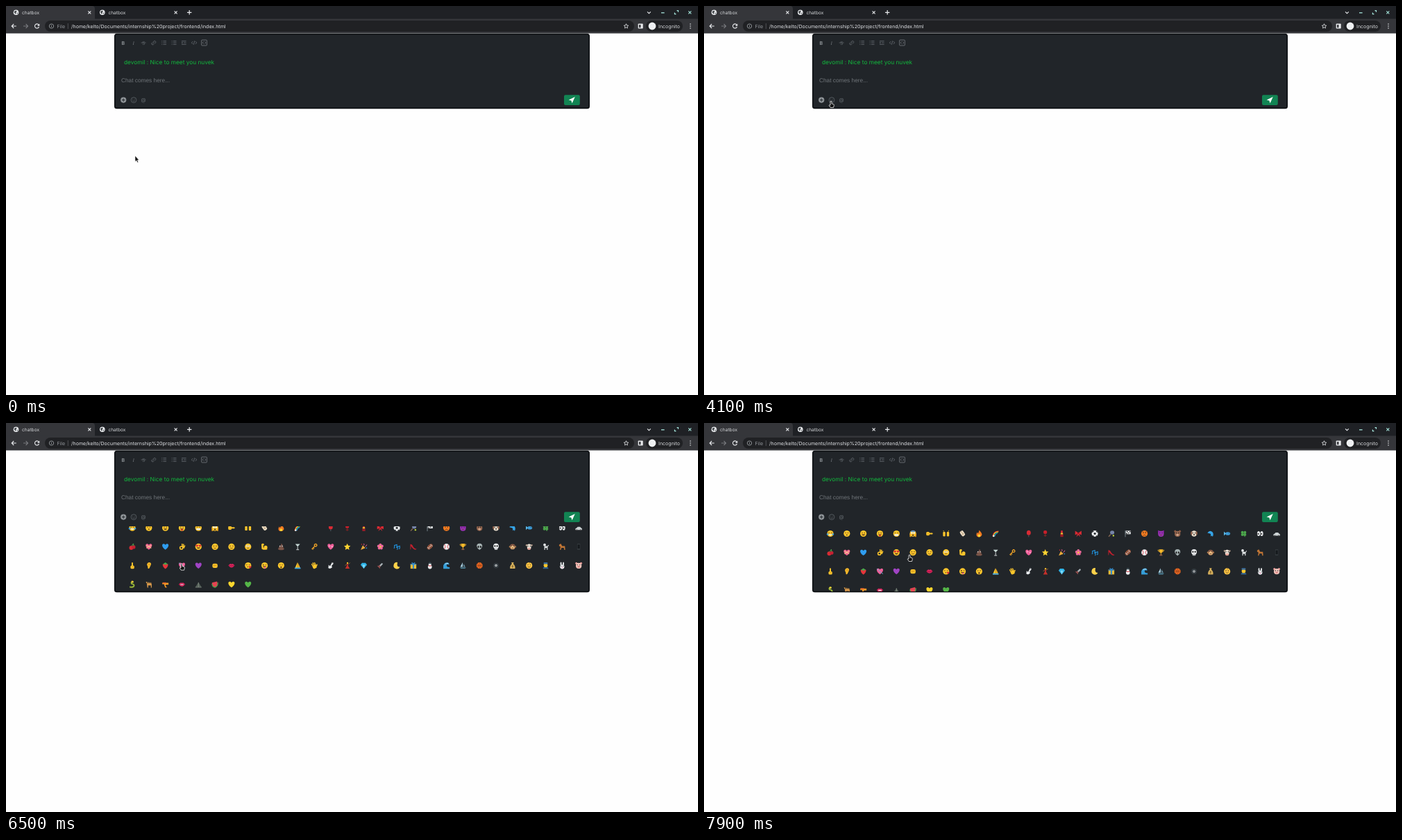
These frames come from a looping animation (997 by 561 pixels, 8 s). An HTML page:

```html
<!DOCTYPE html>
<html lang="en">
<head>
<meta charset="utf-8">
<title>chatbox</title>
<style>
html, body { margin: 0; width: 100%; height: 100%; overflow: hidden; background: #fefefe; }
svg { display: block; width: 997px; height: 561px; }
text { font: 7.05px Inter, sans-serif; text-rendering: geometricPrecision; white-space: pre; }
</style>
</head>
<body>
<svg id="stage" viewBox="0 0 997 561" xmlns="http://www.w3.org/2000/svg"></svg>
<script>
const LOOP = 8000, STEP = 100, OPEN_AT = 4500;

// Drawing helpers
const dot = (x, y, r, f) => `<circle cx="${x}" cy="${y}" r="${r}" fill="${f}"/>`;
const ring = (x, y, r, s, w = 1) => `<circle cx="${x}" cy="${y}" r="${r}" fill="none" stroke="${s}" stroke-width="${w}"/>`;
const fill = (d, f) => `<path d="${d}" fill="${f}"/>`;
const line = (d, s, w = 1) => `<path d="${d}" fill="none" stroke="${s}" stroke-width="${w}"/>`;
const box = (x, y, w, h, f, r = 0) => `<rect x="${x}" y="${y}" width="${w}" height="${h}" rx="${r}" fill="${f}"/>`;
const oval = (x, y, a, b, f) => `<ellipse cx="${x}" cy="${y}" rx="${a}" ry="${b}" fill="${f}"/>`;
const label = (x, y, s, f, size = 7.05, font = 'Inter, sans-serif') =>
  `<text x="${x}" y="${y}" fill="${f}" style="font-size:${size}px;font-family:${font}">${s}</text>`;
const at = (x, y, art, k = 1) => `<g transform="translate(${x} ${y}) scale(${k})">${art}</g>`;

// Emoji, each about 10 units wide around its centre
const Y = '#fcc62c', INK = '#5f4020', RED = '#d92b34', PINK = '#f0609a', BLUE = '#35a5e8',
  GREEN = '#4ca64c', WHITE = '#eceff1', BROWN = '#8a5a44', GREY = '#78858c', ORANGE = '#f47b20';
const eyes = (f = INK, r = .75) => dot(-1.7, -1, r, f) + dot(1.7, -1, r, f);
const grin = (f = WHITE) => fill('M-2.8 1H2.8Q0 5-2.8 1', f);
const face = (mouth, look = eyes(), skin = Y) => dot(0, 0, 4.7, skin) + look + mouth;
const heart = f => fill('M0 4.5C-8-1-4-7 0-2.6C4-7 8-1 0 4.5', f);
const tiny = (x, y, f, k = .4) => at(x, y, heart(f), k);
const smile = line('M-2 1.6Q0 3.4 2 1.6', INK, .8);
const flat = line('M-1.6 2H1.6', INK, .8);
const shut = line('M-3-1h2M1-1h2', INK, .8);
const ears = (f, x = 3.4, y = -3.4, r = 1.6) => dot(-x, y, r, f) + dot(x, y, r, f);
const lips = fill('M-4.7 0Q-2-4 0-2Q2-4 4.7 0Q0 6-4.7 0', '#e0245e') + line('M-4 0Q0 1 4 0', '#8e1238', .8);
const flower = (f, mid) => [0, 1, 2, 3, 4].map(i =>
  dot(2.7 * Math.sin(i * 1.257), -2.7 * Math.cos(i * 1.257), 2, f)).join('') + dot(0, 0, 1.2, mid);
const fist = box(-3.8, -3, 7.6, 6.5, Y, 2.4) + line('M-3 0H2M-1-2V2M1.5-2V1', '#c98b15', .6);
const finger = box(-1, -4.8, 2, 7, Y, 1) + box(-2.6, 0, 5.4, 4.8, Y, 1.6) + line('M-1 2H2', '#c98b15', .6);

const emoji = {
  joy: face(grin(), shut) + dot(-4, 1, 1.3, BLUE) + dot(4, 1, 1.3, BLUE),
  kiss: face(dot(0, 2, .9, INK)),
  happy: face(grin(INK)),
  tongue: face(grin(INK) + box(-1.2, 1.7, 2.4, 2.6, RED, 1)),
  teeth: face(box(-3, .8, 6, 2.4, WHITE, 1), shut),
  scream: face(oval(0, 2.5, 1.1, 1.7, INK), eyes(WHITE, 1.3)) + box(-4.8, 0, 1.8, 5, '#f3a51d', .8) + box(3, 0, 1.8, 5, '#f3a51d', .8) + fill('M-4-2.6Q0-7 4-2.6Z', '#5d8fc4'),
  point: at(0, 0, `<g transform="rotate(90)">${finger}</g>`),
  hands: box(-4.5, -2.5, 3.4, 6.5, Y, 1.2) + box(1.1, -2.5, 3.4, 6.5, Y, 1.2) + line('M-4-4.5l1 1.5M4-4.5l-1 1.5', Y),
  clap: `<g transform="rotate(-35)">${box(-2.8, -4.4, 5.6, 8.2, '#e9dcc4', 2.2)}${line('M0-4V1M-2 1H2', '#a98963', .7)}</g>`,
  fire: fill('M0-5Q5 0 4 2.4Q3 5 0 5Q-4 5-4 1.5Q-4 0-2.6-2L-1.8 0Q0-2 0-5', ORANGE) + oval(0, 3, 1.8, 2, '#fdd835'),
  rainbow: ['#e53935', '#fdd835', '#43a047', '#1e88e5'].map((c, i) => line(`M${i - 4.4} 4Q${i - 3} ${i - 3.8} ${4.4 - i / 2} ${i - 3.5}`, c, 1.2)).join('') + dot(-3, 3.6, 1.3, WHITE),
  none: '',
  balloon: oval(0, -1.2, 3, 3.6, RED) + line('M0 2.4V5', GREY, .6),
  rose: box(-2.6, -4.5, 5.2, 5, '#c91f2b', 2) + line('M0 0V4.6M-2 3H2', '#7c2525', 1.2),
  lipstick: box(-1.4, -4.6, 2.8, 4, RED, 1) + box(-1.7, -1, 3.4, 2.3, Y) + box(-2.2, 1.2, 4.4, 3.6, '#9b1c28'),
  bow: fill('M0-1L-4.7-4V2L0 0L4.7 2V-4ZM-1 0L-3 5L0 2L3 5L1 0', RED) + dot(0, -.5, 1.2, '#a3141d'),
  soccer: dot(0, 0, 4.6, WHITE) + dot(0, 0, 1.6, '#25292c') + line('M-3.8-2L-2-3.6M3.8-2L2-3.6M-3 3L-1.5 4M3 3L1.5 4', '#25292c', 1.3),
  racket: oval(1.2, -1.5, 3.1, 2.8, '#7685a8') + line('M-1 1L-4 4.5', '#8a6a54', 1.4) + dot(3, 3, 1.2, '#c5db3a'),
  flag: box(-3.3, -4.2, 7.4, 5, WHITE) + line('M-3.8-4.5V5', GREY) + line('M-2-3h2M2-3h2M0-1h2M-3 0h2', '#333', 1.3),
  angry: face(line('M-2 3Q0 .8 2 3', INK, .9), eyes(), ORANGE) + line('M-3-3l2 1M3-3l-2 1', INK, .8),
  devil: fill('M-4.5-4.8L-1-3.5L-4 0ZM4.5-4.8L1-3.5L4 0Z', '#8e24aa') + dot(0, .5, 4.2, '#9c32b8') + eyes('#40104f') + smile,
  bear: ears(BROWN) + dot(0, .4, 4.2, '#96674f') + eyes('#222') + oval(0, 2, 1.8, 1.4, '#d2a88e'),
  dog: dot(0, 0, 4.3, '#e8dccb') + oval(-3.8, -.6, 1.2, 2.8, BROWN) + oval(3.8, -.6, 1.2, 2.8, BROWN) + eyes('#333') + dot(0, 1.5, 1, '#333'),
  dolphin: fill('M-4.7-1Q-1-6 3-2Q5 1 3 4.7L2 3L0 4Q1 0-1 0Z', BLUE),
  fish: oval(1, 0, 3.5, 2.4, '#3d9bd6') + fill('M-1.6 0L-4.8-3V3Z', '#5bb9e8') + dot(2.6, -.6, .5, '#123'),
  clover: [[-1.9, -1.9], [1.9, -1.9], [-1.9, 1.6], [1.9, 1.6]].map(p => dot(...p, 2, GREEN)).join('') + line('M0 0Q0 3 2 4.8', GREEN),
  look: oval(-2.3, 0, 2.1, 3.6, WHITE) + oval(2.3, 0, 2.1, 3.6, WHITE) + dot(-2.8, .4, 1.1, '#333') + dot(1.8, .4, 1.1, '#333'),
  car: fill('M-4.8 3V1L-3 0L-1.5-1.6H2L3.4 0L4.8 .8V3Z', '#cdd4d6') + dot(-2.8, 3, 1, '#555') + dot(2.8, 3, 1, '#555'),

  cherry: dot(-1.6, 1.6, 3, RED) + dot(2, .5, 2.6, '#c51f32') + line('M-1-1L1.5-4.6L2-1', GREEN),
  ribbon: heart('#f06292') + line('M-3.6-2L3.6 2M3.6-2L-3.6 2', '#fbd98a', 1),
  blue: heart('#2f9df0'),
  ok: ring(-.8, 1.6, 2.1, Y, 1.6) + line('M.6 .6L.2-4.5M2 1.4L2.4-4M2.6 2.4L4.4-2', Y, 1.5),
  love: face(grin(INK), tiny(-2.2, -1.4, RED) + tiny(2.2, -1.4, RED)),
  wink: face(smile, dot(-1.7, -1, .8, INK) + line('M.8-1h2.2', INK, .8)),
  calm: face(smile, shut),
  blush: face(flat, eyes(WHITE, 1.3) + eyes(INK, .5)),
  arm: line('M-3.4-4L-3 2.4Q0 4 3.6 2.6', Y, 2.6) + dot(1.5, 1, 2.6, Y) + dot(-2.4, -3.3, 1.5, Y),
  poo: oval(0, 3.2, 4.5, 1.8, '#7b5548') + oval(0, .6, 3.3, 1.8, '#7b5548') + fill('M-2-1Q1-3 0-5Q3-3 2-1Z', '#7b5548') + eyes(WHITE, .8),
  glass: fill('M-3.5-4H3.5L0 0Z', '#c6d8d5') + line('M0 0V4M-2 4.4H2', WHITE, .9),
  key: `<g transform="rotate(45)">${ring(0, -3, 1.8, '#f0a428', 1.4)}${line('M0-1V5M0 4H2M0 2H2', '#f0a428', 1.3)}</g>`,
  sparkle: heart(PINK) + dot(-2, -1, .8, '#ffe0ef') + dot(2, 0, .8, '#ffe0ef'),
  star: fill('M0-4.8L1.4-1.6L4.8-1.2L2.2 1.2L3 4.6L0 2.8L-3 4.6L-2.2 1.2L-4.8-1.2L-1.4-1.6Z', '#fdd331'),
  party: fill('M-4.5 4.6L-1.6-2L2.4 2Z', '#e9a93a') + line('M0-2Q1-3 0-4.6M2 0Q4-1 4.4-3', PINK) + dot(4, 2, .8, BLUE) + dot(-3, -3.5, .8, RED),
  bloom: flower('#f06a9b', '#fdd835'),
  notes: line('M-3.5 2V-2L0-3V1M1 4V0L4.2-1V3M-3.5 2h-1M0 1h-1M1 4H0M4 3H3', '#2196e3', 1.1),
  heel: fill('M-4.5-3.6Q-2-4 0 .5Q2 3 4.6 3.4Q4 5 1 4Q-2 2-3.4-1L-3.8 4H-4.6Z', '#c2202e'),
  rugby: `<g transform="rotate(-45)">${oval(0, 0, 5, 3, '#94543c')}${line('M-2 0H2M-3-2V2M3-2V2', WHITE, .8)}</g>`,
  baseball: dot(0, 0, 4.5, WHITE) + line('M-3-3.4Q0 0-3 3.4M3-3.4Q0 0 3 3.4', RED, .8),
  trophy: fill('M-2.8-4.6H2.8Q3 0 0 1Q-3 0-2.8-4.6', '#f8b92a') + line('M-3-3.5H-4.4Q-4-1-2-1M3-3.5H4.4Q4-1 2-1M0 0V4', '#f8b92a', .9) + box(-2, 3, 4, 1.8, BROWN),
  alien: fill('M0-4.8Q4.6-4.6 4-.5Q3 3.4 0 4.8Q-3 3.4-4-.5Q-4.6-4.6 0-4.8', '#a7b4b5') + oval(-1.7, .2, 1.1, 1.6, '#222') + oval(1.7, .2, 1.1, 1.6, '#222'),
  skull: dot(0, -.8, 4, WHITE) + box(-2.2, 2, 4.4, 2.6, WHITE, .8) + eyes('#333', 1.2) + line('M0 1.2V2M-.8 3V4.6M.8 3V4.6', '#555', .6),
  monkey: ears('#c58d54', 4, 0, 1.2) + dot(0, 0, 4, BROWN) + oval(0, 1, 3, 2.8, '#edbd83') + eyes('#333', .6) + flat,
  cow: ears('#bba28e', 3.8, -2.2, 1.2) + box(-2.9, -4, 5.8, 8, '#ece3d7', 2.6) + eyes('#333') + oval(0, 3, 2.5, 1.6, '#e8a69b'),
  poodle: dot(-1.5, -2.8, 1.9, WHITE) + fill('M-2-1H3V4.7H1.8V2H-.8V4.7H-2Z', '#dfe3e4') + line('M3 0L4.2-2.5', WHITE),
  horse: fill('M-4.5-3L-2-4.6L0-1H4L4.4 4.6H3L2.4 1.6H-1L-2 4.6H-3.3L-2.5 0L-4.5-1.3Z', '#c07535'),
  phone: box(-2.3, -4.5, 4.6, 9, '#343a3e', .8) + box(-1.6, -3.2, 3.2, 6, '#15191c'),

  up: finger,
  ear: fill('M-2.8-1Q-2.5-5 1-4.8Q4-4 3-1Q2 1 1.2 3Q0 5.5-1.4 4Q-1 2-2.8-1', '#f9bd2d') + line('M-1-1Q0-4 1.6-2Q1 0 0 1', '#c98b15', .8),
  berry: fill('M-4-2Q0-4 4-2Q4 2 0 5Q-4 2-4-2', '#e5353b') + fill('M-3.5-2.2L0-4.6L3.5-2.2L0-1Z', GREEN),
  arrow: heart(PINK) + line('M-4.6-4L4.6 4', '#6ab4dc', .9),
  purple: heart('#a044c4'),
  fist,
  lips,
  smooch: face(dot(-.4, 2, .8, INK), shut) + tiny(3, 2.3, RED),
  wacky: face(grin(INK) + box(-.5, 1.8, 2.2, 2.6, PINK, 1), dot(-1.8, -1, 1, INK) + line('M1-1h2', INK, .8)),
  wow: face(oval(0, 2.4, 1.1, 1.6, INK)),
  pray: fill('M-.2-4.8L-3 1.5L-4 4.6H0Z', Y) + fill('M.2-4.8L3 1.5L4 4.6H0Z', '#f4b223') + box(-4.4, 3, 8.8, 1.8, BLUE),
  wave: `<g transform="rotate(-25)">${box(-3, -1, 6, 5.4, Y, 2)}${line('M-2.2 0V-4M0 0V-4.8M2.2 0V-4M3 2L4.6 0', Y, 1.5)}</g>`,
  duck: fill('M2-4.7L4-4L3.5-2L1.4 0L2 3L-1 4.6L-3.6 3.6L-3-1L-1 1Z', WHITE) + dot(2.6, -3.8, .5, '#333'),
  dance: dot(.4, -3.8, 1.2, Y) + fill('M-1-2.6L2-2L1 0L3.6 4.6H-3L-.5 0Z', '#c5302b') + line('M2-2L4-4M-1-2L-3 0', '#b77342', .9),
  gem: fill('M-4.7-1.2L-2.6-4H2.6L4.7-1.2L0 4.6Z', '#2fb4e8') + fill('M-2-1.2H2L0 4.6Z', '#87dcf7'),
  rocket: `<g transform="rotate(45)">${box(-1.2, -4.6, 2.4, 8, '#aab4b8', 1.2)}${fill('M-3 3.6L0 0L3 3.6Z', '#8f4b49')}</g>`,
  moon: fill('M1-4.8A4.9 4.9 0 1 0 4.6 2Q-1 2.4 1-4.8', '#fdd24a'),
  gift: box(-4.3, -2.4, 8.6, 7, '#e8bb38') + box(-1, -2.4, 2, 7, '#2f8bd1') + line('M-4.3-1.8H4.3M0-2.4L-2.4-4.4M0-2.4L2.4-4.4', '#2f8bd1', 1.3),
  snow: dot(0, 2, 2.9, WHITE) + dot(0, -1.6, 2.1, WHITE) + box(-1.6, -5, 3.2, 2.3, '#37474f') + line('M-2 .4H2', RED),
  sea: fill('M-4.6 4.7V0Q-3-5 2-4.5Q4.8-3 3.6-1Q1-3 0 0Q1 3 4.7 2.5V4.7Z', '#359ed8') + line('M-2-2Q0-4 2.8-3', WHITE, .8),
  boat: fill('M-.4-4.8V2H-4Z', '#a9cfe0') + fill('M.6-3V2H3.6Z', '#638a9b') + fill('M-4.5 2.6H4.5L3 4.6H-3Z', '#4e8297'),
  basket: dot(0, 0, 4.6, '#ef6c25') + line('M-4.6 0H4.6M0-4.6V4.6M-3-3.4Q0 0-3 3.4M3-3.4Q0 0 3 3.4', '#7d3514', .6),
  eight: dot(0, 0, 4, '#343b40') + dot(0, 0, 1.8, '#c3c9cc') + dot(0, 0, .6, '#222'),
  money: fill('M-1.8-4.8H1.8L1-2.6Q4.6 1 3.6 4.6H-3.6Q-4.6 1-1-2.6Z', '#d8b25c') + line('M0-.6V3.6M-1.3 1H1.3', '#6a4e20', .8),
  baby: face(smile, eyes(), '#fbc444') + line('M0-4.8Q2-4 0-3', INK, .7),
  guard: fill('M-4 4.8Q-4 1.6 0 1.6Q4 1.6 4 4.8Z', '#346590') + dot(0, -.4, 2.9, Y) + box(-3, -4.7, 6, 2.5, '#3c6f9e', 1),
  bunny: oval(-1.8, -2.7, 1, 2.4, WHITE) + oval(1.8, -2.7, 1, 2.4, WHITE) + dot(0, 1.7, 3.2, WHITE) + at(0, 2, eyes('#444', .6)) + dot(0, 2.6, .7, PINK),
  pig: ears('#e79a98') + dot(0, .3, 4.2, '#f4c6bd') + eyes('#333') + oval(0, 1.8, 1.9, 1.3, '#dc8a87'),

  snake: line('M2-3.6Q-3-4-1-1Q4 0 2 3Q0 4.6-4 3.6', '#9aba39', 1.9) + dot(0, -3.8, 1.5, '#f0c837'),
  camel: fill('M-4.5-4H-2.4L-1.4-1L0-4L1.5-1.4L3-3.4L4.2 0V4.7H3V1.4H-1V4.7H-2.2L-3-1.6Z', '#d99a4c'),
  pistol: fill('M-4.6-2.4H4.6V.4H1L0 1.8L2.5 4.6H-.4L-2-.4H-4.6Z', '#f59b27') + box(-4, -3, 5, 1.5, '#e35d28'),
  mouth: lips + box(-2.5, -.4, 5, 1.2, WHITE, .5),
  tent: fill('M0-3L4.6 4H-4.6Z', '#515d55') + line('M-4.5 4.2H4.5M0-3V4', '#98a096', .7),
  melon: fill('M-4.4-2.5L3-4.4Q5.5 2 0 4.4Q-4.5 3.6-4.4-2.5', '#e44352') + line('M4-3Q5 2 0 4.4Q-4 4-4.4-1', GREEN, 1.2),
  yellow: heart('#fdd62e'),
  green: heart('#55b648'),
};
const rows = [
  'joy kiss happy tongue teeth scream point hands clap fire rainbow none balloon rose lipstick bow soccer racket flag angry devil bear dog dolphin fish clover look car',
  'cherry ribbon blue ok love wink calm blush arm poo glass key sparkle star party bloom notes heel rugby baseball trophy alien skull monkey cow poodle horse phone',
  'up ear berry arrow purple fist lips smooch wacky wow pray wave duck dance gem rocket moon gift snow sea boat basket eight money baby guard bunny pig',
  'snake camel pistol mouth tent melon yellow green',
];
const grid = rows.map((row, r) => row.split(' ').map((name, c) =>
  at(182 + c * 23.82, 162.2 + r * 27.2, emoji[name], .98)).join('')).join('');

// Browser frame
const globe = dot(0, 0, 3.8, '#e8eaed') + fill('M-3-1L0-2.6L1-1L-.4 0L0 1.4L-1 2.6ZM1 1L3 .2L1.6 2.6Z', '#3c4043');
const cross = (x, c = '#e8eaed') => line(`M${x - 2} 7.3l4 4m0-4l-4 4`, c, 1.1);
const tab = x => at(x, 9.2, globe) + label(x + 8.6, 11.6, 'chatbox', '#d5d7da', 6.6) + cross(x + 105.8);
const MINT = '#a5e6dc', SOFT = '#e8eaed';
const browser =
  box(0, 0, 997, 19, '#1f2125') + fill('M0 0H124Q128 0 128 4V19H0Z', '#35363a') +
  box(0, 18.5, 997, 21, '#35363a') + box(56, 21, 849, 16, '#202124', 8) + box(922, 21, 53, 16, '#202124', 8) +
  tab(14.5) + tab(138.8) + line('M261 9.3h6.4M264.2 6.1v6.4', SOFT, 1.2) +
  line('M924 8.3l2.4 2.4l2.4-2.4', SOFT, 1.1) + line('M944 9.8h4.6', MINT, 1.3) + cross(985.3, MINT) +
  line('M966.5 6.7h2v2M963.4 9.6v2h2', MINT, 1.2) +
  line('M14.8 29H8.3M11.2 26l-3 3l3 3', SOFT, 1.1) + line('M25 29h6.5M28.6 26l3 3l-3 3', '#77797d', 1.1) +
  line('M47.2 27.3A3.1 3.1 0 1 0 47.5 30', SOFT, 1.1) + fill('M48.3 25.4v3.3h-3.3Z', SOFT) +
  ring(65.5, 29, 3.2, '#a3a7ab', .8) + line('M65.5 28.5v2.2M65.5 27v.8', '#a3a7ab', .8) +
  label(73.5, 31.5, 'File', '#94989d') + line('M89.3 25v8', '#63666a', .7) +
  label(94, 31.5, '/home/kelto/Documents/internship%20project/frontend/index.html', '#dfe1e5') +
  at(893.5, 29, line('M0-3.3L1-1L3.3-.8L1.5 .8L2 3L0 1.8L-2 3L-1.5 .8L-3.3-.8L-1-1Z', SOFT, .8)) +
  box(910.7, 25.5, 7, 7, SOFT, .8) + box(912, 27, 2.5, 4.2, '#35363a') +
  dot(931, 29, 5.4, '#eef0f2') + label(940, 31.5, 'Incognito', '#d5d7da') +
  [26, 29, 32].map(y => dot(986, y, .8, SOFT)).join('');

// Chat panel
const DIM = '#60666b';
const list = x => line(`M${x - 3.3} 50.6h1m1.2 0h4.6M${x - 3.3} 53h1m1.2 0h4.6M${x - 3.3} 55.4h1m1.2 0h4.6`, DIM, .9);
const tools =
  label(166.5, 55.6, '<tspan font-weight="800">B</tspan>', '#81868a', 7) +
  label(182.6, 55.6, '<tspan font-style="italic">I</tspan>', '#777c81', 7, 'Liberation Serif, serif') +
  label(196, 55.6, 'S', DIM, 7) + line('M194.6 53h7', DIM, .8) +
  line('M211.4 54.4l2.4-2.6M211.8 52l1.4-1.4q1.4-.8 2.4.6t-.4 2l-1 1M213.4 54.6l-1 1q-1.4 1-2.4-.4t.4-2l.8-.8', DIM, .9) +
  list(227.5) + list(242) + line('M253 50.6h6.6M256 53h3.6M253 55.4h6.6M253 52l1.7 1l-1.7 1', DIM, .9) +
  line('M269.3 51l-2 2l2 2M272.8 51l2 2l-2 2M271.8 50.2l-1.5 5.6', DIM, .9) +
  `<rect x="281.6" y="49" width="7.8" height="8" rx="1" fill="none" stroke="#777c81" stroke-width=".8"/>` +
  line('M284.6 51.2l-1.5 1.8l1.5 1.8M286.4 51.2l1.5 1.8l-1.5 1.8', '#777c81', .7);
const controls =
  dot(169.2, 135.6, 4.1, '#8f9498') + line('M167 135.6h4.4M169.2 133.4v4.4', '#25292d', 1) +
  at(184, 135.6, ring(0, 0, 3.9, DIM, .8) + dot(-1.3, -.8, .5, DIM) + dot(1.3, -.8, .5, DIM) + line('M-1.8 1Q0 2.8 1.8 1', DIM, .7)) +
  label(194.6, 138, '@', '#6a7075', 7.3) +
  box(804, 128.3, 22.8, 14.6, '#128453', 2) + fill('M819.8 131l-9.2 4.5l3.8 1l1.2 3.8Z', '#fff');

const hand = `<path d="M-1 .4Q0-.8 1 .4V3.6L3.8 4.4Q4.6 4.8 4.2 6.4L3.6 9.2H-.8L-2.8 6Q-2.6 4.8-1 5.8Z" fill="#111" stroke="#f4f4f4" stroke-width=".8"/>`;
const arrow = `<path d="M0 0V8.4L1.9 6.8L3.2 9.8L4.6 9.2L3.3 6.3H5.6Z" fill="#111" stroke="#fff" stroke-width=".5"/>`;

const stage = document.getElementById('stage');
stage.innerHTML = `<clipPath id="view"><rect x="158" y="149" width="681" height="94"/></clipPath>` +
  box(0, 0, 997, 561, '#fefefe') + browser +
  `<rect id="panel" x="156.8" y="40.6" width="683.4" rx="3" fill="#212529" stroke="#0e1114" stroke-width="1.7"/>` +
  tools + label(170, 84.2, 'devomil : Nice to meet you nuvek', '#12b73d', 8.31) +
  label(166, 109.8, 'Chat comes here...', '#70757a', 8.3, 'Liberation Sans, Arial, sans-serif') + controls +
  `<g id="tray" clip-path="url(#view)"><g id="grid">${grid}</g></g>` +
  `<g id="cursor"><g id="arrow">${arrow}</g><g id="hand">${hand}</g></g>`;

const [panel, tray, sheet, cursor, arrowEl, handEl] =
  ['panel', 'tray', 'grid', 'cursor', 'arrow', 'hand'].map(id => document.getElementById(id));

// Keys: time, then values, linear in between
const path = [
  [1200, 186, 216], [1500, 184, 196], [1800, 172, 172], [2100, 167, 151], [2200, 167, 151],
  [2500, 195, 134], [3100, 194, 135], [3400, 190, 150], [3700, 174, 128], [4000, 183, 137.3],
  [4700, 183, 137.3], [5200, 224, 207], [6200, 224, 207], [6500, 253, 203], [6800, 270, 198],
  [6900, 270, 198], [7200, 296, 192.3], [7800, 296, 192.3], [7900, 296, 190.3],
];
const scroll = [[6200, 0], [6500, 11], [6900, 11], [7200, 0], [7800, 0], [7900, 2.7]];

function sample(keys, t) {
  const i = keys.findIndex(k => k[0] > t);
  if (i === 0) return keys[0].slice(1);
  if (i < 0) return keys[keys.length - 1].slice(1);
  const [a, b] = [keys[i - 1], keys[i]], u = (t - a[0]) / (b[0] - a[0]);
  return a.slice(1).map((v, j) => v + (b[j + 1] - v) * u);
}

function draw(now) {
  const t = Math.floor((now % LOOP) / STEP) * STEP;
  const [x, y] = sample(path, t), open = t >= OPEN_AT;
  const pointing = t >= 2300 && (open || y < 144);
  panel.setAttribute('height', open ? 202.8 : 106.8);
  tray.style.display = open ? '' : 'none';
  sheet.setAttribute('transform', `translate(0 ${-sample(scroll, t)[0]})`);
  cursor.setAttribute('transform', `translate(${x} ${y})`);
  arrowEl.style.display = pointing ? 'none' : '';
  handEl.style.display = pointing ? '' : 'none';
}

const start = performance.now();
function tick() {
  draw(performance.now() - start);
  requestAnimationFrame(tick);
}
tick();
</script>
</body>
</html>
```
